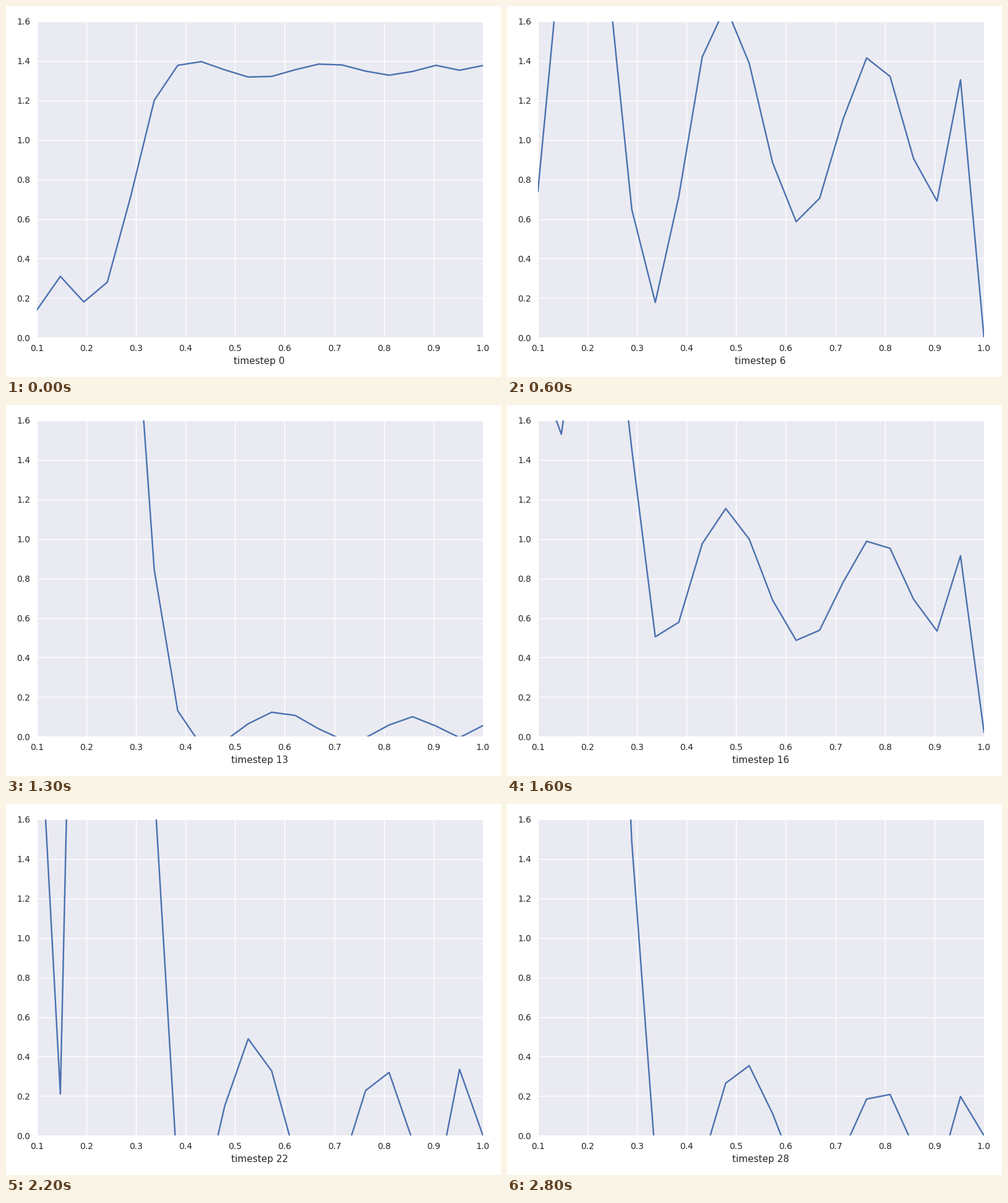
These frames come from a looping animation (800x600 px, 2.9 s). A matplotlib script:

```python
import numpy as np
import matplotlib.pyplot as plt
from matplotlib.animation import FuncAnimation

W, H, DPI = 800, 600, 100
LEFT, RIGHT, TOP, BOTTOM = 49.9, 770.9, 25, 536.3
STEPS, STEP_MS = 29, 100
INK = "#262626"

plt.rcParams["font.family"] = "DejaVu Sans"

x = np.linspace(0.1, 1.0, 20)
theta = np.arccos(np.clip((x - 0.55) / 0.45, -1, 1))


def step_down(center, width):
    """Smooth fall from 1 to 0 around center."""
    return 1 / (1 + np.exp((x - center) / width))


def curve(level, amp, freq, phase=0, tail=0, tail_end=0.25,
          dip=0, dip_at=0.13, pin=0):
    """Chebyshev-like ripple on a level, with a plateau and a dip at the left.

    pin pulls the right end to zero and strengthens the ripple beside it.
    """
    envelope = 1 / x + 6 * pin * np.exp((x - 1) / 0.025)
    ripple = -amp * envelope * np.cos(freq * theta + phase)
    ripple *= 1 - step_down(0.24, 0.02)
    notch = dip * np.exp(-((x - dip_at) / 0.025) ** 2 / 2)
    y = level + ripple + tail * step_down(tail_end, 0.025) - notch
    return y * (1 - pin * np.exp((x - 1) / 0.012))


# The curve moves evenly from one pose to the next.
POSES = {
    0: curve(1.355, 0.022, 10, np.pi, tail=-1.25, tail_end=0.285,
             dip=-0.2, dip_at=0.147),
    6: curve(1.05, 0.3, 9.1, tail=1.3, tail_end=0.215, dip=1.6, dip_at=0.1, pin=1),
    10: curve(0.015, 0.038, 9.4, 1.2, tail=4, tail_end=0.291),
    13: curve(0.045, 0.048, 9.4, 1.8, tail=4, tail_end=0.298),
    18: curve(1.25, 0.33, 9.1, dip=1.75, pin=1),
    22: curve(0.03, 0.25, 10.3, -0.75, tail=6, tail_end=0.313, dip=7.4, pin=1),
    28: curve(0, 0.19, 9.8, -0.4, tail=6, tail_end=0.253, dip=4.3, dip_at=0.1, pin=1),
}
pose_steps = list(POSES)
pose_columns = np.array(list(POSES.values())).T


def heights(step):
    return [np.interp(step, pose_steps, column) for column in pose_columns]


fig = plt.figure(figsize=(W / DPI, H / DPI), dpi=DPI, facecolor="white")
ax = fig.add_axes([LEFT / W, 1 - BOTTOM / H, (RIGHT - LEFT) / W, (BOTTOM - TOP) / H],
                  facecolor="#EAEAF2")
ax.set(xlim=(0.1, 1.0), ylim=(0, 1.6))
ax.set_xticks(np.arange(1, 11) / 10, [f"{k / 10:.1f}" for k in range(1, 11)])
ax.set_yticks(np.arange(0, 9) / 5, [f"{k / 5:.1f}" for k in range(9)])
ax.set_axisbelow(True)
ax.grid(color="white", linewidth=1)
ax.tick_params(length=0, labelsize=10, labelcolor=INK)
ax.tick_params(axis="x", pad=7.4)
ax.tick_params(axis="y", pad=7.7)
for spine in ax.spines.values():
    spine.set_visible(False)

line, = ax.plot(x, heights(0), color="#4C72B0", linewidth=1.75)
label = fig.text(409.6 / W, 1 - 579 / H, "", fontsize=11, color=INK,
                 ha="center", va="baseline")


def draw(step):
    line.set_ydata(heights(step))
    label.set_text(f"timestep {step}")
    return line, label


anim = FuncAnimation(fig, draw, frames=STEPS, interval=STEP_MS,
                     repeat=True, repeat_delay=0)
plt.show()
```
